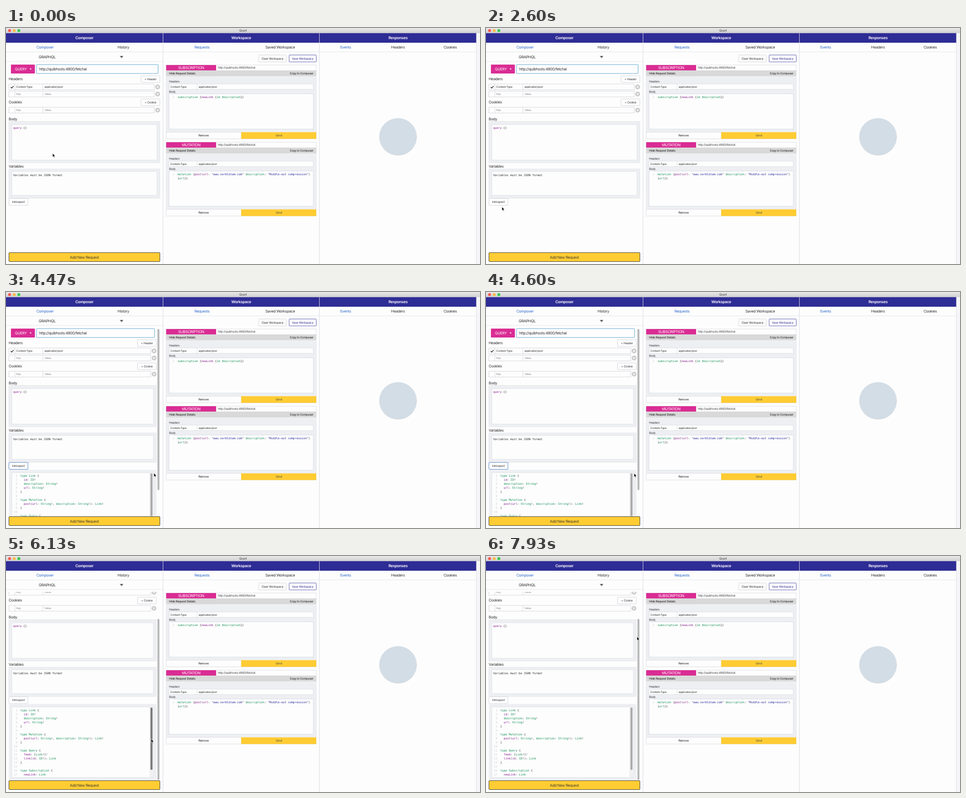
These frames come from a looping animation (1058 px wide and 529 px high, 8 s). An HTML page:

```html
<!DOCTYPE html>
<html lang="en">
<head>
<meta charset="utf-8">
<title>Quorl</title>
<style>
html, body { margin: 0; width: 100%; height: 100%; overflow: hidden; background: #fdfdfd; }
svg { display: block; width: 100vw; height: 100vh; }
text {
  font-family: Inter, "Open Sans", sans-serif;
  letter-spacing: -.04em;
  text-rendering: geometricPrecision;
  white-space: pre;
}
.mono { font-family: "DejaVu Sans Mono", "Noto Sans Mono", monospace; letter-spacing: 0; }
</style>
</head>
<body>
<svg id="stage" viewBox="0 0 1058 529" xmlns="http://www.w3.org/2000/svg"></svg>
<script>
const LOOP = 8000;
const INK = '#2f2f33', NAVY = '#2e2c95', PINK = '#da2c94', GOLD = '#ffcc33';
const EDGE = '#d4d6dc', PANEL = '#eeeff2', PAPER = '#fdfdfd', BLUE = '#2b67c9', FAINT = '#85858c';
const ADDRESS = 'http://quibhosts:4800/fetchal';
const MONO = 6.3, LINE = 9;

// Shape helpers: boxes take left, top, right, bottom; text is centred on y.
const box = (l, t, r, b, fill = PAPER, stroke = 'none', extra = '') =>
  `<rect x="${l}" y="${t}" width="${r - l}" height="${b - t}" fill="${fill}" stroke="${stroke}" ${extra}/>`;
const line = (x1, y1, x2, y2, color = EDGE) =>
  `<path d="M${x1} ${y1}L${x2} ${y2}" stroke="${color}" fill="none"/>`;
const text = (x, y, str, size = 6.45, fill = INK, extra = '') =>
  `<text x="${x}" y="${y + size * .36}" font-size="${size}" fill="${fill}" ${extra}>${str}</text>`;
const mid = (x, y, str, size, fill, extra = '') =>
  text(x, y, str, size, fill, 'text-anchor="middle" ' + extra);
const button = (l, t, r, b, str, stroke = EDGE, color = INK, extra = '') =>
  box(l, t, r, b, PAPER, stroke, 'rx="1" ' + extra) + mid((l + r) / 2, (t + b) / 2, str, 6.45, color);

function paint(src) {
  return src.replace(/"[^"]*"|\w+/g, (word, at) => {
    let color = '#07894f';
    if (word[0] === '"') color = '#1c1c96';
    else if (/^(newLink|post|feed|link|query)$/.test(word)) color = '#82128c';
    else if (/^(id|url)$/.test(word) && src[at + word.length] === ':') color = '#82128c';
    return `<tspan fill="${color}">${word}</tspan>`;
  });
}
const code = (x, y, src) => text(x, y, paint(src), MONO, INK, 'class="mono"');
const lineNo = (x, y, n) => text(x, y, n, MONO, '#c9cbd0', 'class="mono" text-anchor="end"');

const SCHEMA = `type Link {
  id: ID!
  description: String!
  url: String!
}

type Mutation {
  post(url: String!, description: String!): Link!
}

type Query {
  feed: [Link!]!
  link(id: ID!): Link
}

type Subscription {
  newLink: Link
}`.split('\n');

function field(y, right, key, value, filled) {
  const color = filled ? INK : FAINT, cx = right + 7.5;
  return box(6.5, y - 6.5, right, y + 6.5, PAPER, EDGE) +
    line(20, y - 6.5, 20, y + 6.5) + line(82.5, y - 6.5, 82.5, y + 6.5) +
    (filled ? `<path d="M10.5 ${y + .5}l2.3 2.3l4.2-5" stroke="#111" stroke-width="1.3" fill="none"/>` : '') +
    text(23, y, key, 6, color) + text(86, y, value, 6, color) +
    `<circle cx="${cx}" cy="${y}" r="5.4" fill="#cbcbcb"/>` +
    `<path d="M${cx - 2} ${y - 2}l4 4m0-4l-4 4" stroke="#fff" stroke-width="1.1"/>`;
}

function schemaBox() {
  return box(6.5, 398.5, 336, 569, PANEL) +
    box(13, 405, 329, 563, PAPER, '#dfe1e6') +
    `<g clip-path="url(#editor)">` +
    SCHEMA.map((src, i) => {
      const y = 412 + i * LINE;
      return lineNo(25, y, i + 1) + code(32, y, src);
    }).join('') + '</g>' +
    box(320, 405, 329, 563, '#f1f1f3') +
    box(322.5, 406.5, 327, 546, '#ababab', 'none', 'id="innerThumb" rx="1.5"');
}

// The request form; inset makes room for the scrollbar once the schema is loaded.
function form(inset) {
  const r = 344 - inset;
  return box(11, 82, 64.5, 102, PINK, 'none', 'rx="1.5"') +
    text(20, 92, 'QUERY', 8.2, '#fff') +
    '<path d="M52.5 90.7h5l-2.5 2.8z" fill="#fff"/>' +
    box(68, 82, r - 4.5, 102, PAPER, '#58a3cf', 'rx="1"') +
    text(74, 92, ADDRESS, 8.35) +
    text(6, 113.5, 'Headers', 8.35) +
    button(r - 42.5, 107, r - .5, 122, '+ Header') +
    field(132, r - 13, 'Content-Type', 'application/json', true) +
    field(148, r - 13, 'Key', 'Value') +
    text(6, 165.5, 'Cookies', 8.35) +
    button(r - 42.5, 159, r - .5, 174, '+ Cookie') +
    field(184, r - 13, 'Key', 'Value') +
    text(6, 203.5, 'Body', 8.35) +
    box(6.5, 209.5, r - .5, 302, PANEL, '#e3e5e9') +
    box(13, 216.5, r - 7, 296, PAPER, '#dfe1e6') +
    code(16, 223.7, 'query {}') +
    text(6, 309.5, 'Variables', 8.35) +
    box(6.5, 316, r - .5, 381.5, PANEL, '#e3e5e9') +
    box(13, 321.5, r - 7, 375, PAPER, '#dfe1e6') +
    text(16, 329.3, 'Variables must be JSON format', MONO, '#222', 'class="mono"') +
    (inset ? schemaBox() : '') +
    button(6.5, 382, 49, 397.5, 'Introspect', EDGE, INK, 'class="probe"');
}

function card(y, kind, lines) {
  return `<g transform="translate(0 ${y})">` +
    box(357.5, 0, 692.5, 165.5, PAPER, '#dcdee3') +
    box(357.5, 0, 469, 12, PINK) + mid(413.3, 6, kind, 8.4, '#fff') +
    text(473, 6, ADDRESS, 6.55, '#444') +
    box(357.5, 12, 692.5, 25, '#d9d9d9') +
    text(364, 18.5, 'Hide Request Details', 6.5, '#111') +
    text(686, 18.5, 'Copy to Composer', 6.4, '#111', 'text-anchor="end"') +
    box(357.5, 25, 692.5, 150.5, PANEL) +
    text(364, 36.7, 'Headers', 6.25) +
    box(364, 42.3, 686, 54.5, PAPER, '#dfe1e6') + line(426.5, 42.3, 426.5, 54.5, '#dfe1e6') +
    text(367, 48.5, 'Content-Type', 6) + text(430, 48.5, 'application/json', 6) +
    text(364, 59.5, 'Body', 6.25) +
    box(364, 64.5, 686, 143.5, PAPER, '#d6dbe6') +
    lineNo(375.5, 71.6, 1) +
    lines.map((src, i) => code(383, 71.6 + i * LINE, src)).join('') +
    box(357.5, 150.5, 525, 165.5, PAPER, '#dcdee3') + mid(441, 158, 'Remove', 6.4, '#111') +
    box(525, 150.5, 692.5, 165.5, GOLD) + mid(609, 158, 'Send', 6.4, '#4d4a40') + '</g>';
}

function chrome() {
  const lights = ['#fc5753', '#fdbc40', '#34c84a']
    .map((c, i) => `<circle cx="${8 + i * 10.3}" cy="5.7" r="3.2" fill="${c}"/>`).join('');
  const heads = [[175, 'Composer'], [525, 'Workspace'], [875, 'Responses']]
    .map(([x, s]) => mid(x, 21.8, s, 8.6, '#fff', 'font-weight="600"')).join('');
  const tabs = [[87, 'Composer', 1], [262, 'History'], [437.5, 'Requests', 1], [612, 'Saved Workspace'],
    [758, 'Events', 1], [875, 'Headers'], [991.5, 'Cookies']]
    .map(([x, s, on]) => mid(x, 43.5, s, 8.3, on ? BLUE : INK)).join('');
  return box(0, 0, 1058, 529) + box(0, 0, 1058, 11.5, 'url(#bar)') + lights +
    mid(529, 5.8, 'Quorl', 6.9, '#444') +
    box(1050, 11.5, 1058, 529, '#f6f6f8') +
    box(0, 11.5, 1050, 33, NAVY) + heads + tabs +
    line(0, 53.5, 1050, 53.5, '#e3e5ea') + line(0, 75, 350, 75, '#e3e5ea') +
    [350.5, 699.5, 1050].map(x => line(x, 11.5, x, 529, '#d9dbe2')).join('') +
    text(73, 64.7, 'GRAPHQL', 8.4) + '<path d="M254 62.7h8l-4 4.6z" fill="#555"/>' +
    button(564, 60.5, 625.5, 76, 'Clear Workspace') +
    button(632, 60.5, 692.5, 76, 'Save Workspace', '#5c5aab', NAVY) +
    '<circle cx="875" cy="244" r="42" fill="#d3dde5"/>';
}

const stage = document.getElementById('stage');
stage.innerHTML = `<defs>
  <linearGradient id="bar" x2="0" y2="1"><stop stop-color="#e8e8e8"/><stop offset="1" stop-color="#d0d0d0"/></linearGradient>
  <clipPath id="pane"><rect y="80.5" width="350" height="422"/></clipPath>
  <clipPath id="editor"><rect x="13" y="405" width="308" height="157.5"/></clipPath>
  </defs>` + chrome() +
  `<g clip-path="url(#pane)"><g id="before">${form(0)}</g><g id="after">${form(8)}</g></g>` +
  box(338, 83, 342.5, 444, '#b9b9bb', 'none', 'id="outerThumb" rx="2"') +
  box(6.5, 503.5, 343.5, 523.5, GOLD, '#3a3a3e', 'rx="1.5"') +
  mid(175, 514, 'Add New Request', 8.25, '#3f3c33') +
  card(83, 'SUBSCRIPTION', ['subscription {newLink {id description}}']) +
  card(256, 'MUTATION', [
    'mutation {post(url: "www.vorbletam.com" description: "Middle-out compression")', '{url}}']) +
  '<path id="pointer" d="M0 0v8.2l1.9-1.7l1.3 3l1.4-.6l-1.3-2.9h2.6z" fill="#000" stroke="#fff" stroke-width=".7"/>';

// Pointer path: time, x, y
const PATH = [
  [0, 104, 281], [650, 99, 274], [1430, 80.5, 250], [1700, 76, 256], [2600, 35.5, 401],
  [2850, 29, 390], [3300, 29, 390], [4470, 330, 406], [4700, 331, 407], [5330, 323, 412],
  [6670, 324.5, 409], [7930, 337, 181], [LOOP, 337, 181]
];
const LOADED = 3070, PRESS = 2950, BLUR = 5700;
const SCROLL = [4680, 5160, 66.7];

const ease = p => p * p * (3 - 2 * p);
const ramp = (t, a, b) => ease(Math.min(1, Math.max(0, (t - a) / (b - a))));
const get = id => document.getElementById(id);
const show = (node, on) => node.setAttribute('display', on ? 'inline' : 'none');
const before = get('before'), after = get('after'), outer = get('outerThumb');
const inner = get('innerThumb'), pointer = get('pointer');
const probes = document.querySelectorAll('.probe');

function draw(t) {
  const i = PATH.findIndex((p, n) => n + 1 === PATH.length - 1 || t < PATH[n + 1][0]);
  const [t0, x0, y0] = PATH[i], [t1, x1, y1] = PATH[i + 1];
  const k = ramp(t, t0, t1);
  const x = x0 + (x1 - x0) * k, y = y0 + (y1 - y0) * k;
  pointer.setAttribute('transform', `translate(${x} ${y})`);

  const loaded = t >= LOADED;
  show(before, !loaded);
  show(after, loaded);
  show(outer, loaded);

  const top = SCROLL[2] * ramp(t, SCROLL[0], SCROLL[1]);
  after.setAttribute('transform', `translate(0 ${-top})`);
  outer.setAttribute('y', 83 + top * .868);

  const hover = loaded && x > 320 && x < 328 && y > 405 - top;
  inner.setAttribute('fill', hover ? '#7a7a7a' : '#ababab');
  const focus = t >= PRESS && t < BLUR;
  probes.forEach(p => p.setAttribute('stroke', focus ? '#4f86c6' : EDGE));
}

const start = performance.now();
function tick() {
  draw((performance.now() - start) % LOOP);
  requestAnimationFrame(tick);
}
tick();
</script>
</body>
</html>
```
